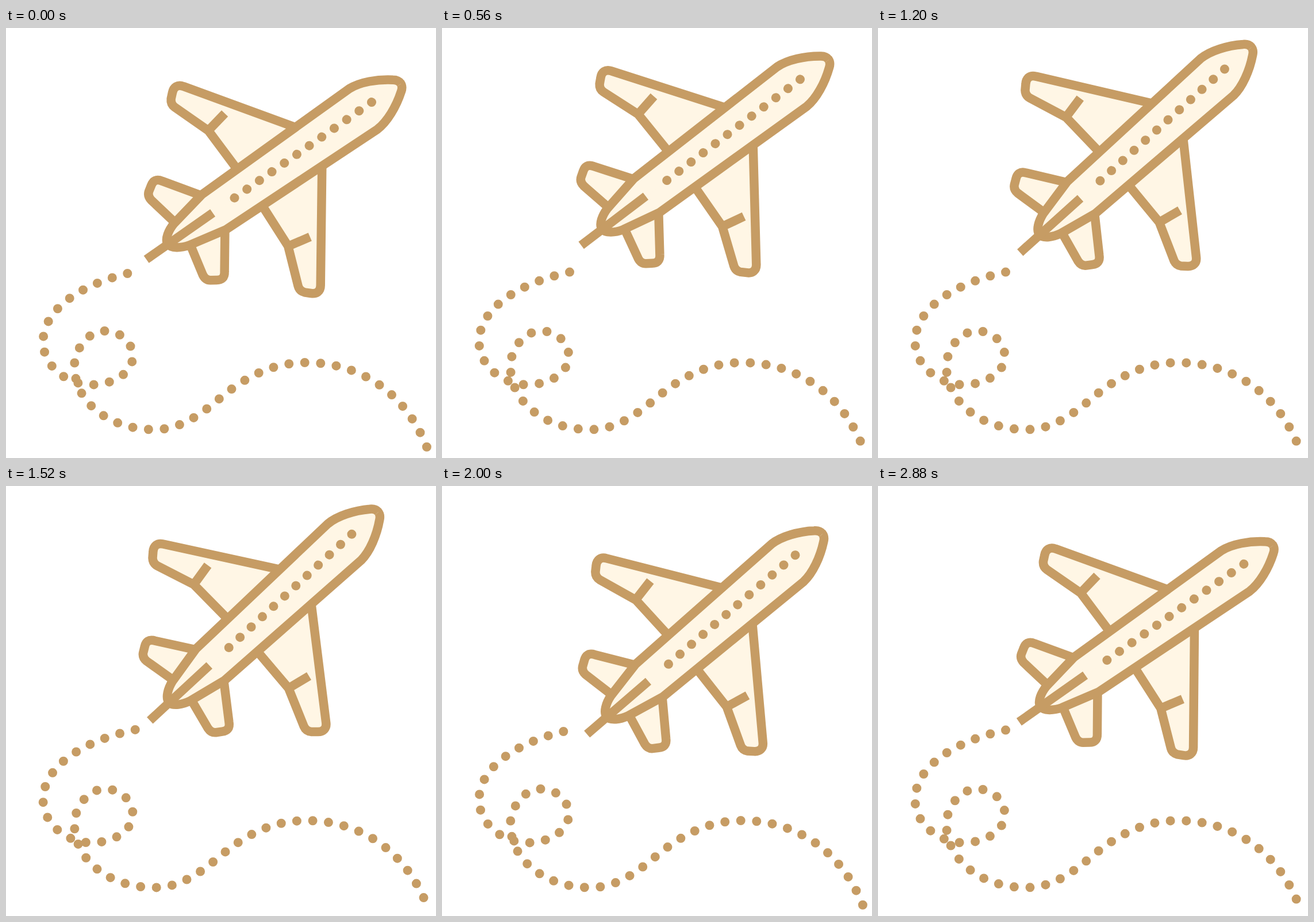
Recreate the animation shown at these times as an HTML page. Size 748 px wide and 748 px high, loop 2.96 s.

```html
<!DOCTYPE html>
<html lang="en">
<head>
<meta charset="utf-8">
<title>Airplane with dotted trail</title>
<style>
  html, body { margin: 0; width: 100%; height: 100%; overflow: hidden; background: #fff; }
  svg { display: block; width: 100%; height: 100%; }
  path { fill: none; stroke: #c69c64; stroke-width: 15.5; }
  .body { fill: #fff6e5; }
  .dots { stroke-width: 16; stroke-linecap: round; }
</style>
</head>
<body>
<svg viewBox="0 0 748 748">
  <path id="trail" class="dots" pathLength="49.87" stroke-dasharray="0 1"
    d="M732 729C697 640 622 582 522 582C462 582 415 608 371 645C332 678 299 698.5 258 698.5
      C181 698.5 119 652 119 588C119 561 141 527 172 527C199 527 220.5 547 220.5 571
      C220.5 600 187 620.5 148 620.5C105 620.5 64.5 587 64.5 546C64.5 488 134 441 234.5 422"/>
  <g id="plane">
    <!-- drawn along the x axis, nose to the right -->
    <g transform="translate(397.5 295.5) rotate(-34.6)">
      <g id="half">
        <!-- wing, flap, tailplane, half of the fuselage -->
        <path class="body" d="M156 42L37 210C31 219 22 219 15 212L7 204.5Q1 197.5 4 189L29 122L32 40"/>
        <path d="M28 122L69.5 130.5"/>
        <path class="body" d="M-45 36L-87 95.5C-93 105 -100 105 -107 100L-116 94Q-123 89 -121.5 79L-110 25"/>
        <path class="body" d="M-141 -1V0C-141 10 -126 19 -112 23L-44 37L272 43C294 42 322 29 343.5 12.5C348.5 9 351 4.5 351 0V-1"/>
      </g>
      <use href="#half" transform="scale(1 -1)"/>
      <path d="M-187 1L-46 0"/>
      <path class="dots" d="M0 0L292.5 -1.6" stroke-dasharray="0 26.44"/>
    </g>
  </g>
</svg>
<script>
const trail = document.getElementById('trail');
const plane = document.getElementById('plane');

const LOOP_MS = 2960, STEP_MS = 80;
const CYCLE = 90;                    // ticks per full swing, 30 ticks per second
const TICKS_PER_STEP = 12 / 5;
const TICKS_PER_DOT = 10;            // time in which the trail moves by one dot

// Eased back-and-forth between 0 and 1 over one cycle.
function swing(tick) {
  const u = 1 - Math.abs(1 - (tick % CYCLE) / (CYCLE / 2));
  return u * u * (3 - 2 * u);
}

function draw() {
  const step = Math.floor((performance.now() % LOOP_MS) / STEP_MS);
  const tick = Math.floor(step * TICKS_PER_STEP);

  const angle = -7.8 * swing(tick);
  const lift = 29.5 * (1 - 2 * swing(tick + CYCLE / 4));
  plane.setAttribute('transform',
    `translate(${0.141 * lift} ${lift}) rotate(${angle} 287 360)`);

  // The tiny shift keeps the first dot inside the path.
  trail.setAttribute('stroke-dashoffset', (tick % TICKS_PER_DOT) / TICKS_PER_DOT - 0.01);
  requestAnimationFrame(draw);
}

draw();
</script>
</body>
</html>
```
